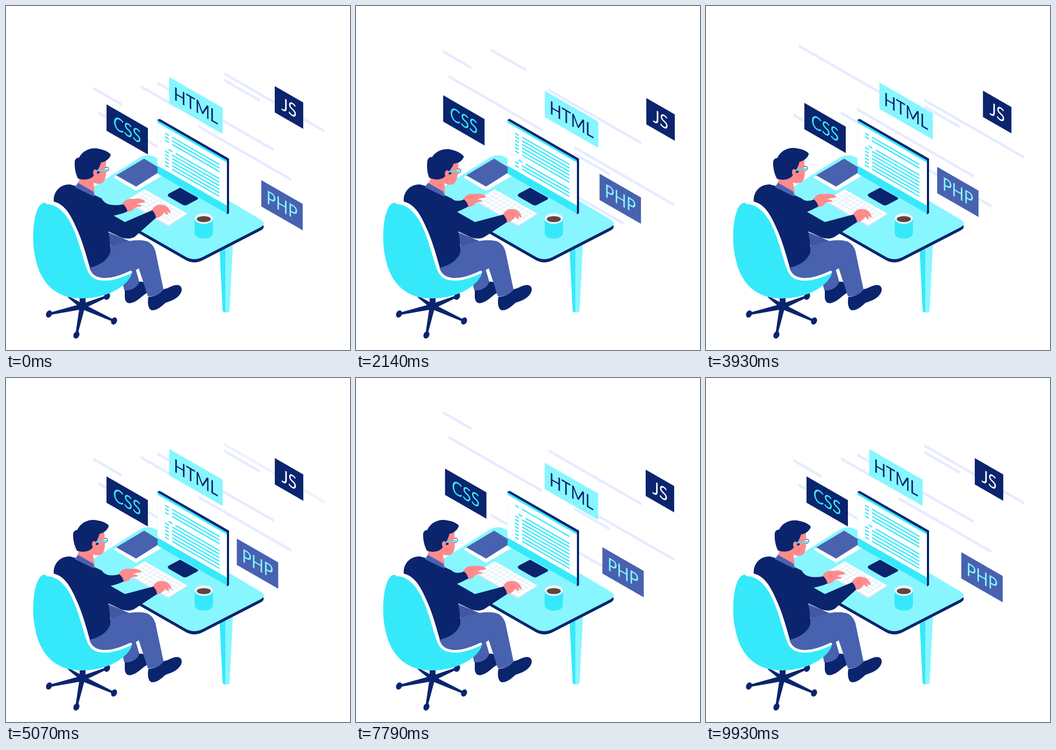
An HTML page with a canvas that plays this animation: 640x640 px, repeating every 10 s.

```html
<!DOCTYPE html>
<html lang="en">
<head>
<meta charset="utf-8">
<title>Developer at a desk</title>
<style>
html, body { margin: 0; width: 100%; height: 100%; overflow: hidden; background: #fff; }
canvas { display: block; width: 100vw; height: 100vh; }
</style>
</head>
<body>
<canvas id="stage" width="640" height="640"></canvas>
<script>
const ctx = document.getElementById('stage').getContext('2d');
const LOOP = 10000, HALF = 5000, SLOPE = 0.575;
const NAVY = '#0a246e', BLUE = '#4862b0', SHADE = '#4058a2', CYAN = '#36e9fa',
      LIGHT = '#87f6ff', SKIN = '#ff8a8c', PALE = '#e7ebff', WHITE = '#fff';

function fill(color, d) {
  ctx.fillStyle = color;
  ctx.fill(new Path2D(d));
}
function line(color, width, d) {
  ctx.strokeStyle = color;
  ctx.lineWidth = width;
  ctx.lineCap = ctx.lineJoin = 'round';
  ctx.stroke(new Path2D(d));
}
function oval(color, x, y, rx, ry, turn = 0) {
  ctx.fillStyle = color;
  ctx.beginPath();
  ctx.ellipse(x, y, rx, ry, turn, 0, Math.PI * 2);
  ctx.fill();
}
// Parallelogram with upright ends, following the isometric slope.
function slant(color, x1, x2, y, height) {
  const drop = (x2 - x1) * SLOPE;
  fill(color, `M${x1},${y}L${x2},${y + drop}V${y + drop + height}L${x1},${y + height}Z`);
}

const clamp = v => Math.max(0, Math.min(1, v));
const ease = v => { const p = clamp(v); return p * p * (3 - 2 * p); };
// Eased out and back; peak and end are fractions of the period.
function sway(t, period, peak, end) {
  const p = t % period / period;
  return p < peak ? ease(p / peak) : ease((end - p) / (end - peak));
}
// Eases from 0 to 1 after start and back to 0 before end.
const pulse = (t, start, end, ramp = 500) => ease((t - start) / ramp) * ease((end - t) / ramp);

// Each line drifts up, jumps to the bottom at its own moment and returns home.
const streaks = [
  { x: 162, width: 53, home: 150, jump: 3150 },
  { x: 251, width: 66, home: 147, jump: 2420 },
  { x: 172, width: 174, home: 196, jump: 4130 },
  { x: 281, width: 217, home: 140, jump: 1370 },
  { x: 358, width: 173, home: 221, jump: 3080 },
  { x: 406, width: 186, home: 123, jump: 140 },
  { x: 406, width: 66, home: 135, jump: 600 }
];
function drawStreaks(t) {
  const p = t % HALF;
  for (const { x, width, home, jump } of streaks) {
    const shift = p < jump ? -p * 0.0318 : Math.max(0, HALF - 70 - p) * 0.0492;
    ctx.globalAlpha = clamp(Math.abs(p - jump) / 100);
    slant(PALE, x, x + width, home + shift, 5.5);
  }
  ctx.globalAlpha = 1;
}

const tags = [
  { text: 'CSS', x: 187, y: 183, w: 77, dx: -25, dy: -17, back: NAVY, ink: CYAN, period: HALF, peak: 0.45, end: 0.9 },
  { text: 'HTML', x: 303.5, y: 132, w: 99.5, dx: 50, dy: 27, back: LIGHT, ink: NAVY, period: HALF, peak: 0.49, end: 1 },
  { text: 'JS', x: 500, y: 149, w: 53, dx: 41.5, dy: 23, back: NAVY, ink: WHITE, period: HALF, peak: 0.48, end: 1 },
  { text: 'PHP', x: 475, y: 324, w: 77, dx: -47, dy: -26, back: BLUE, ink: LIGHT, period: LOOP, peak: 0.45, end: 1 }
];
function drawTags(t) {
  ctx.font = '34px Lato, sans-serif';
  ctx.textAlign = 'center';
  for (const tag of tags) {
    const m = sway(t, tag.period, tag.peak, tag.end);
    ctx.save();
    ctx.translate(tag.x + tag.dx * m, tag.y + tag.dy * m);
    slant(tag.back, 0, tag.w, 0, 49);
    ctx.transform(0.866, 0.866 * SLOPE, 0, 1, 0, 0);
    ctx.fillStyle = tag.ink;
    ctx.fillText(tag.text, tag.w / 2 / 0.866, 36.7);
    ctx.restore();
  }
}

function drawDesk() {
  fill(CYAN, 'M397,445 L403,567 Q404,570 409,570 L409,445Z');
  fill(LIGHT, 'M408,445 H422 L416,567 Q414,571 408,570Z');
  const top = 'M160,338 L249,282 Q265,273 281,283 L473,397 Q486,405 473,412 L366,467 Q350,475 335,467 L160,367Z';
  ctx.save();
  ctx.translate(0, 6);
  fill(NAVY, top);
  ctx.restore();
  fill(LIGHT, top);

  fill(WHITE, 'M200,319 L257,286 L292,312 V315 L242,344Z');
  fill(BLUE, 'M205,315 L257,284 L291,305 L242,336Z');
  fill(NAVY, 'M303,349 L324,338 L356,356 Q359,358 356,360 L337,370 Q333,372 329,370 L303,355 Q299,352 303,349Z');
}

// Code scrolls up one row at a time: eight full rows, a blank one, an indented one.
function drawCode(t) {
  const step = 6.6, count = 10, top = 235.4;
  const scrolled = Math.ceil(t / 125);
  for (let i = 0; i < count; i++) {
    const row = (i + scrolled + 6) % count;
    if (row === 0) continue;
    const indent = row === 1 ? 6.5 : 0;
    const y = top + i * step;
    for (const [x1, x2] of [[296 + indent, 303 + indent], [309 + indent, 397]])
      slant(CYAN, x1, x2, y + (x1 - 296) * SLOPE, 2.7);
  }
}

function drawMonitor(t) {
  slant(WHITE, 282, 411, 213, 98);
  slant('#d9f8fd', 281.5, 282.3, 216, 80);
  slant(CYAN, 282, 411, 212, 5);
  slant(CYAN, 282, 411, 297, 15);
  fill(NAVY, 'M281,212 L286,210 L415,284 V385 L411,388 V287Z');
  drawCode(t);
}

function drawKeyboardAndCup() {
  fill('#cfe3f3', 'M223,362 L302,407 L337,385 V388 L302,411 L223,365Z');
  fill(WHITE, 'M223,362 L258,341 L337,386 L302,408Z');
  for (let i = 1; i < 5; i++)
    line('#d3e8f6', 1, `M${226 + i * 7},${362.5 - i * 4.2} l73,41.5`);
  for (let i = 1; i < 11; i++)
    line('#d3e8f6', 1, `M${226 + i * 7},${362.5 + i * 4} l31,-18.5`);
  fill(CYAN, 'M351,396 V423 C352,436 384,436 385,423 V396Z');
  oval('#eef0fa', 368, 395.5, 17, 10);
  oval('#5b473f', 368, 396.5, 13, 5.5);
}

function drawChairBase() {
  fill(NAVY, 'M137,538 H148 V562 H137Z');
  for (const [x, y] of [[80, 573], [188, 540], [201, 586], [131, 612]]) {
    const a = Math.atan2(y - 559, x - 142), s = Math.sin(a), c = Math.cos(a);
    fill(NAVY, `M${142 - s * 5},${559 + c * 5}L${x - s * 2},${y + c * 2}L${x + s * 2},${y - c * 2}L${142 + s * 5},${559 - c * 5}Z`);
    oval(NAVY, x, y, 5.3, 7, 0.45);
  }
  fill(NAVY, 'M113,538 L145,555 L140,563 L116,543Z');
}

function drawLegs() {
  fill(NAVY, 'M221,529 L248,513 Q256,512 258,517 L262,534 C252,539 246,550 231,553 Q222,553 221,543Z');
  fill(BLUE, 'M205,495 L241,489 L248,513 C244,525 231,530 220,529 L214,503Z');
  fill(SHADE, 'M188,420 L215,431 L231,438 L196,452Z');
  fill(NAVY, 'M265,541 C277,541 287,535 293,527 C304,525 309,519 319,519 C328,520 329,529 324,536 C316,547 305,549 297,552 C289,559 281,567 271,566 C264,564 263,551 265,541Z');
  fill(BLUE, 'M153,490 L190,450 C205,443 230,434 253,436 C267,437 274,444 278,456 L293,527 C287,536 277,541 264,540 L247,488 L210,510 L160,512Z');
}

function drawChair() {
  fill(CYAN, 'M72,366 C98,366 116,388 128,419 C140,448 144,472 152,491 C159,512 190,514 232,495 Q235,498 232,503 C220,525 184,545 137,544 C93,543 63,516 54,465 C46,424 53,366 72,366Z');
  line(WHITE, 5, 'M76,366 C101,367 118,389 130,419 C142,448 146,473 154,491 C162,512 190,515 232,495');
}

function drawHead(t) {
  const forward = pulse(t, 100, 2900) + pulse(t, 5200, 7500);
  const back = pulse(t, 2800, 5600) + pulse(t, 7250, 9600);
  ctx.save();
  ctx.translate(150, 352);
  ctx.rotate((4.5 * forward - 2.8 * back) * Math.PI / 180);
  ctx.translate(-150, -352);
  fill(SKIN, 'M140,315 L165,295 L186,288 L186,299 L189,306 L186,309 C186,320 183,328 177,330 C172,332 167,330 163,329 L165,348 L160,352 L133,331Z');
  fill(NAVY, 'M134,321 C129,312 127,299 128,288 Q130,282 136,282 C143,268 160,262 174,266 C186,268 194,274 195,277 C192,286 184,290 177,291 C175,297 173,302 169,307 L162,317 C155,324 143,324 134,321Z');
  oval(SKIN, 166, 310, 4, 6);
  fill(NAVY, 'M170,306 L174,305 V311 L169,312Z');
  oval('#d8fbff', 187, 304, 3.5, 3.8);
  line(NAVY, 0.9, 'M185,300.5 L190,300 Q192,301 191,305 Q190,308 186,308');
  line(CYAN, 2.6, 'M170,306.5 L188,304.5');
  ctx.restore();
}

function drawHand(x, y, d) {
  ctx.save();
  ctx.translate(x, y);
  fill(SKIN, d);
  ctx.restore();
}

function drawMan(t) {
  const typing = pulse(t, 100, 9650);
  const reach = 1 - typing + 0.6 * pulse(t, 4600, 5600);
  const fx = 17 * reach, fy = 9 * reach;
  const nx = 2 * typing, ny = 8 * typing - 10;
  drawHand(fx, fy, 'M199,360 C204,352 211,348 220,350 C230,348 240,351 242,355 C240,358 235,356 231,358 L225,360 C231,360 236,361 235,364 C229,365 225,364 222,367 C218,373 212,374 206,374Z');
  drawHand(nx, ny, 'M271,390 C276,382 284,378 291,380 C300,381 306,389 306,395 C304,397 302,393 299,391 L302,397 C299,400 296,395 294,394 C290,401 284,404 277,405Z');

  drawLegs();
  fill(NAVY, `M150,345 L178,358 Q186,${366 + fy} ${201 + fx},${360 + fy} Q${207 + fx},${365 + fy} ${209 + fx},${373 + fy} Q${198 + fx},${379 + fy} 188,${383 + fy} L165,395Z`);
  fill(NAVY, 'M89,364 C87,346 101,331 119,332 L130,335 L165,355 C181,357 186,370 187,385 L190,418 C193,435 195,448 194,459 C188,474 173,483 156,487 C148,459 141,434 131,413 C120,387 108,368 89,364Z');
  fill(NAVY, `M170,375 L188,388 C199,393 209,402 221,402 L${272 + nx},${390 + ny} Q${278 + nx},${396 + ny} ${279 + nx},${404 + ny} L240,429 C231,435 218,433 209,428 L185,417Z`);
  drawChair();
  drawHead(t);
  fill(BLUE, 'M134,329 L162,345 Q165,350 165,355 L128,337Z');
}

function render(t) {
  ctx.fillStyle = WHITE;
  ctx.fillRect(0, 0, 640, 640);
  drawStreaks(t);
  drawTags(t);
  drawDesk();
  drawMonitor(t);
  drawKeyboardAndCup();
  drawChairBase();
  drawMan(t);
}

const start = performance.now();
function tick() {
  render((performance.now() - start) % LOOP);
  requestAnimationFrame(tick);
}
tick();
</script>
</body>
</html>
```
